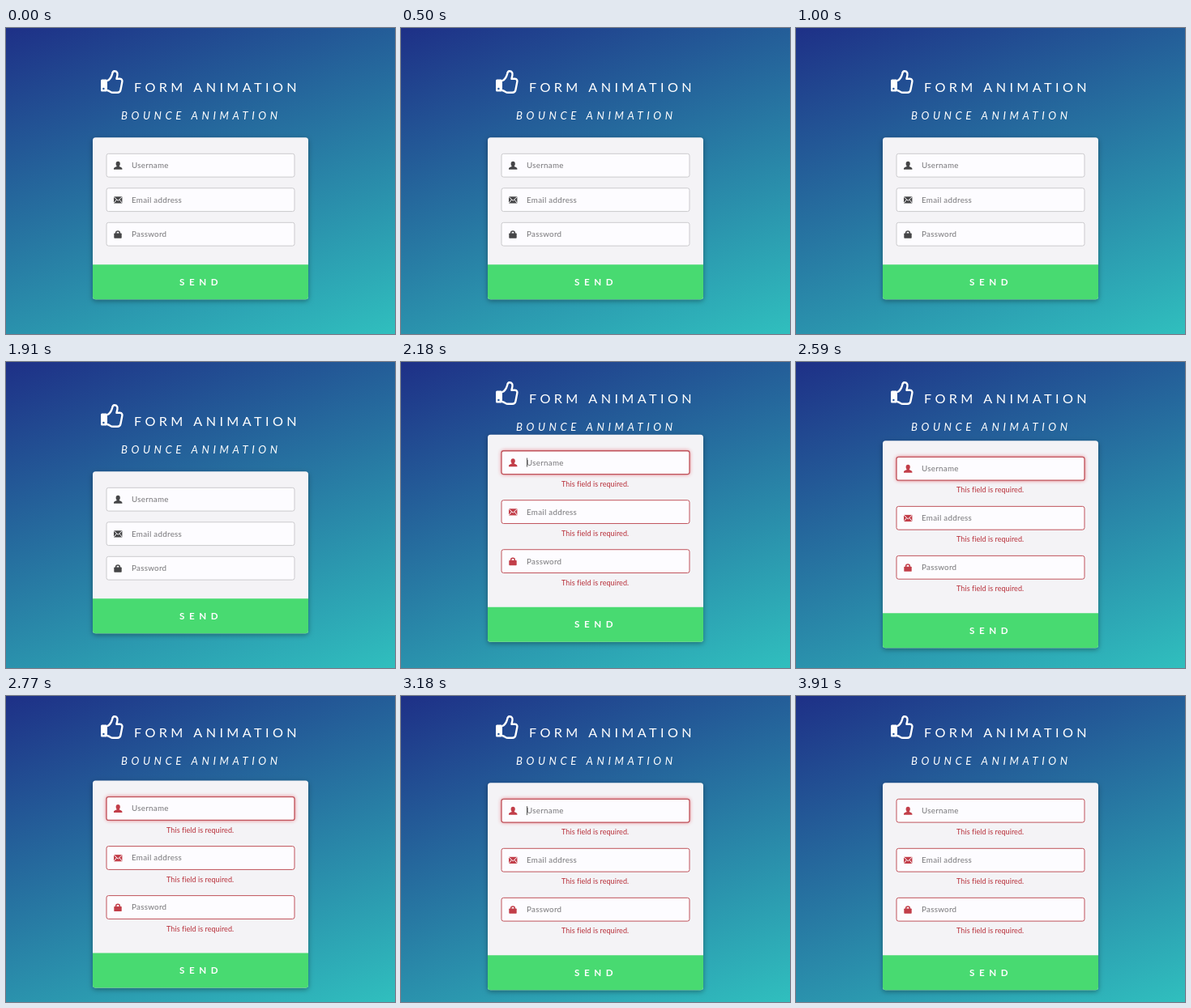
Write an HTML page with a canvas that moves like this. It is 480 px wide and 378 px high and loops after 3960 ms.

```html
<!DOCTYPE html>
<html lang="en">
<head>
<meta charset="utf-8">
<title>Form animation</title>
<style>
html, body { margin: 0; width: 100%; height: 100%; overflow: hidden; background: #2878a3; }
canvas { display: block; width: 480px; height: 378px; }
</style>
</head>
<body>
<canvas id="stage"></canvas>
<script>
const W = 480, H = 378, LOOP = 3960;
const INVALID_AT = 1950, BLUR_AT = 3550, BOUNCE_START = 1880, BOUNCE_TIME = 1000;
const FONT = 'Raleway, Lato, "Open Sans", sans-serif';
const FIELDS = ['Username', 'Email address', 'Password'];

const canvas = document.getElementById('stage');
const ctx = canvas.getContext('2d');
const ratio = window.devicePixelRatio || 1;
canvas.width = W * ratio;
canvas.height = H * ratio;

function bezier(x1, y1, x2, y2) {
  const at = (a, b, s) => 3 * a * s * (1 - s) ** 2 + 3 * b * s * s * (1 - s) + s ** 3;
  return x => {
    let lo = 0, hi = 1;
    for (let i = 0; i < 24; i++) {
      const mid = (lo + hi) / 2;
      if (at(x1, x2, mid) < x) lo = mid; else hi = mid;
    }
    return at(y1, y2, lo);
  };
}

// Each stop: progress, offset, easing of the stretch that follows.
const rise = bezier(0.215, 0.61, 0.355, 1);
const fall = bezier(0.755, 0.05, 0.855, 0.06);
const BOUNCE = [
  [0.2, 0, rise], [0.4, -20, fall], [0.43, -20, fall], [0.53, 0, rise],
  [0.7, -10, fall], [0.8, 0, rise], [0.9, -2.7, rise], [1, 0, rise]
];

function bounceAt(t) {
  const p = (t - BOUNCE_START) / BOUNCE_TIME;
  for (let i = 1; i < BOUNCE.length; i++) {
    const [p0, y0, ease] = BOUNCE[i - 1], [p1, y1] = BOUNCE[i];
    if (p >= p0 && p < p1) return y0 + (y1 - y0) * ease((p - p0) / (p1 - p0));
  }
  return 0;
}

function label(text, x, y, size, color, { weight = 400, style = 'normal', gap = 0 } = {}) {
  ctx.font = `${style} ${weight} ${size}px ${FONT}`;
  ctx.letterSpacing = gap + 'px';
  ctx.fillStyle = color;
  ctx.fillText(text, x, y);
}

function box(x, y, w, h, r) {
  ctx.beginPath();
  ctx.roundRect(x, y, w, h, r);
}

function shadow(color, blur, dy = 0) {
  ctx.shadowColor = color;
  ctx.shadowBlur = blur * ratio;
  ctx.shadowOffsetY = dy * ratio;
}

function at(x, y, draw) {
  ctx.save();
  ctx.translate(x, y);
  draw();
  ctx.restore();
}

function background() {
  const a = 160 * Math.PI / 180, dx = Math.sin(a), dy = -Math.cos(a);
  const half = (W * dx + H * dy) / 2;
  const g = ctx.createLinearGradient(W / 2 - dx * half, H / 2 - dy * half, W / 2 + dx * half, H / 2 + dy * half);
  g.addColorStop(0, '#1e3087');
  g.addColorStop(1, '#30bfbe');
  ctx.fillStyle = g;
  ctx.fillRect(0, 0, W, H);
}

function thumb() {
  ctx.fillStyle = ctx.strokeStyle = '#fff';
  ctx.lineWidth = 2.4;
  ctx.lineJoin = 'round';
  box(0, 11.6, 8, 14.8, 1.5);
  ctx.fill();
  ctx.stroke(new Path2D('M8 13.2C11 12.4 13.4 7.6 14 5C14.4 2.4 15 1.2 16.8 1.2' +
    'C20 1.2 21 4 20.4 6.6L19.4 10.8H23.6C26.2 10.8 26.9 13 26.2 15.2L24.4 24.4' +
    'C24 26.9 22.6 27.8 20.4 27.8H15C12 27.8 10.6 25.2 8 25.2'));
  ctx.fillStyle = '#24559a';
  ctx.beginPath();
  ctx.arc(3.4, 23, 1.2, 0, 7);
  ctx.fill();
}

const ICONS = [
  () => {
    ctx.beginPath();
    ctx.ellipse(5.2, 3, 2.6, 3.1, 0, 0, 7);
    ctx.fill();
    ctx.fill(new Path2D('M3.7 4H6.7V6.2C7.8 7.2 10.4 7.2 10.4 9V10H0V9C0 7.2 2.6 7.2 3.7 6.2Z'));
  },
  () => {
    ctx.fillRect(0, 1, 10.4, 8.2);
    ctx.strokeStyle = '#fdfcff';
    ctx.lineWidth = 1;
    ctx.stroke(new Path2D('M0 1.2L5.2 6L10.4 1.2M0 9L3.5 4.8M10.4 9L6.9 4.8'));
  },
  () => {
    box(0.3, 3.8, 9.4, 6.2, 0.7);
    ctx.fill();
    ctx.strokeStyle = ctx.fillStyle;
    ctx.lineWidth = 1.5;
    ctx.stroke(new Path2D('M2.7 4.4V3.2C2.7 0.4 7.3 0.4 7.3 3.2V4.4'));
  }
];

function field(i, y, invalid, focused, caret) {
  const active = focused && i === 0;
  box(124, y + 0.2, 232, 28.8, 2.5);
  ctx.save();
  if (active) shadow('rgba(222,70,82,.85)', 5);
  ctx.fillStyle = '#fdfcff';
  ctx.fill();
  ctx.restore();
  ctx.strokeStyle = invalid ? '#c0535b' : '#cbcacd';
  ctx.lineWidth = active ? 1.3 : 1;
  ctx.stroke();

  at(133, y + 9.7, () => {
    ctx.fillStyle = invalid ? '#c23e49' : '#454547';
    ICONS[i]();
  });
  label(FIELDS[i], 155, y + 18, 9.8, '#777679', { gap: 0.28 });
  if (active && caret) {
    ctx.fillStyle = '#333';
    ctx.fillRect(155, y + 9, 0.8, 11);
  }
  if (invalid) label('This field is required.', 198, y + 44.2, 9, '#b8303a', { gap: 0.07 });
}

function form(y, invalid, focused, caret) {
  const height = invalid ? 256 : 200, split = height - 43;
  box(107, y, 266, height, 3.5);
  ctx.save();
  shadow('rgba(0,0,0,.36)', 6, 2);
  ctx.fillStyle = '#f4f3f6';
  ctx.fill();
  ctx.restore();
  box(107, y + split, 266, 43, [0, 0, 3.5, 3.5]);
  ctx.fillStyle = '#48da71';
  ctx.fill();
  label('SEND', 214, y + split + 25.6, 11.6, '#fff', { weight: 700, gap: 5.6 });
  const step = invalid ? 61 : 42.5;
  FIELDS.forEach((_, i) => field(i, y + 19.8 + i * step, invalid, focused, caret));
}

function draw(t) {
  const invalid = t >= INVALID_AT;
  const focused = invalid && t < BLUR_AT;
  const caret = focused && (t - INVALID_AT) % 1000 < 500;
  const lift = invalid ? -28 : 0;

  ctx.setTransform(ratio, 0, 0, ratio, 0, 0);
  background();
  at(117, 52 + lift, thumb);
  label('FORM ANIMATION', 158, 79 + lift, 16.2, '#fff', { gap: 4.4 });
  label('BOUNCE ANIMATION', 142, 112.6 + lift, 13.2, '#fff', { style: 'italic', gap: 4.57 });
  form(135.3 + lift + bounceAt(t), invalid, focused, caret);
}

const start = performance.now();
function tick() {
  draw((performance.now() - start) % LOOP);
  requestAnimationFrame(tick);
}
tick();
</script>
</body>
</html>
```
